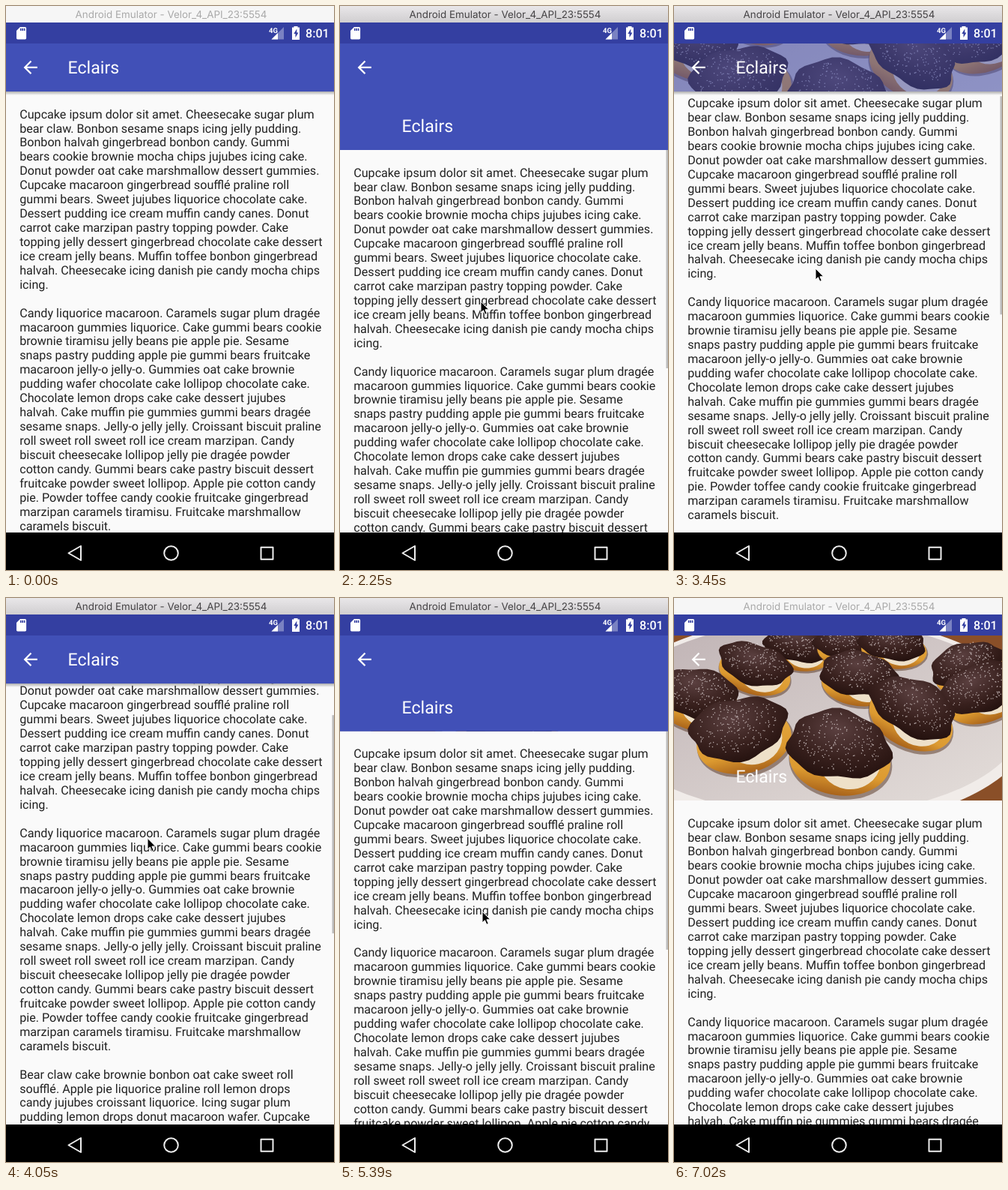
An HTML page for the animation above (7120 ms loop, 438x752 px).

```html
<!DOCTYPE html>
<html lang="en">
<head>
<meta charset="utf-8">
<title>Collapsing toolbar</title>
<style>
html, body { margin: 0; width: 100%; height: 100%; overflow: hidden; background: #fafafa; }
svg { display: block; width: 100%; height: 100%; }
text { font-family: Roboto, sans-serif; text-rendering: geometricPrecision; }
#caption { font: 13.4px Inter, sans-serif; }
#body text { font-size: 16.14px; fill: #212121; }
</style>
</head>
<body>
<svg viewBox="0 0 438 752">
  <defs>
    <linearGradient id="chrome" x2="0" y2="1"><stop stop-color="#e9e7e9"/><stop offset="1" stop-color="#d0ced0"/></linearGradient>
    <linearGradient id="shade" x2="0" y2="1"><stop stop-opacity=".3"/><stop offset="1" stop-opacity="0"/></linearGradient>
    <linearGradient id="plate" x2="1" y2="1"><stop stop-color="#bdb0b2"/><stop offset="1" stop-color="#e6e0dc"/></linearGradient>
    <linearGradient id="dough" x2="0" y2="1"><stop stop-color="#e9b04a"/><stop offset=".7" stop-color="#dc9a30"/><stop offset="1" stop-color="#a9631a"/></linearGradient>
    <radialGradient id="choc" cx=".45" cy=".3" r=".7"><stop stop-color="#5b4040"/><stop offset=".6" stop-color="#38201d"/><stop offset="1" stop-color="#25120f"/></radialGradient>
    <clipPath id="header"><rect id="headerBox" y="50" width="438" height="64"/></clipPath>
  </defs>
  <rect width="438" height="752" fill="#fafafa"/>
  <g id="body"></g>
  <rect id="thumb" x="435.5" width="2.5" height="291" fill="#bcbcbc"/>
  <rect id="shadow" y="114" width="438" height="5" fill="url(#shade)"/>
  <g clip-path="url(#header)">
    <g id="photo"></g>
    <rect id="scrim" y="50" width="438" height="220" fill="#4150b7"/>
  </g>
  <path transform="translate(19 68.2) scale(1.14)" fill="#fff" d="M20 11H7.83l5.59-5.59L12 4l-8 8 8 8 1.41-1.41L7.83 13H20z"/>
  <text id="title" x="82.6" font-size="23.1" fill="#fff">Eclairs</text>
  <rect y="22" width="438" height="28" fill="#343fa1"/>
  <g fill="#fff">
    <path transform="translate(10.7 26.4) scale(.82)" d="M18 2h-8L4 8v12c0 1.1.9 2 2 2h12c1.1 0 2-.9 2-2V4c0-1.1-.9-2-2-2zm-6 6h-2V4h2zm3 0h-2V4h2zm3 0h-2V4h2z"/>
    <path d="M371 28v16.5h-16.5z" opacity=".35"/>
    <path d="M363 36v8.5h-8.5z"/>
    <text x="351" y="35.5" font-size="9.5" font-weight="700">4G</text>
    <path d="M384.5 28.5v-1.5h5v1.5h2.500V45h-10V28.500z"/>
    <path d="M388.3 30.5l-4 6.500h2.200v5l4-6.500h-2.200z" fill="#343fa1"/>
    <text x="400" y="41.8" font-size="16.1" font-weight="500">8:01</text>
  </g>
  <rect id="chromeBox" width="438" height="22"/>
  <text id="caption" x="220.5" y="16" text-anchor="middle">Android Emulator - Velor_4_API_23:5554</text>
  <rect y="702" width="438" height="50"/>
  <g fill="none" stroke="#eee" stroke-width="2" stroke-linejoin="round">
    <path d="M100 720v19L83.5 729.5z"/>
    <circle cx="220.5" cy="729.5" r="9.3"/>
    <path d="M340.5 721.700h16v16h-16z"/>
  </g>
  <path id="cursor" d="M0 0V15l3.400-3.300 2.400 5.600 2.500-1-2.400-5.500h4.800z" stroke="#fff"/>
</svg>
<script>
const LOOP = 7120, LINE = 18.93, OPEN = 270, CLOSED = 114, RANGE = OPEN - CLOSED;
const $ = id => document.getElementById(id);
const set = (el, attrs) => { for (const k in attrs) el.setAttribute(k, attrs[k]); return el; };
const add = (parent, tag, attrs) =>
  parent.appendChild(set(document.createElementNS('http://www.w3.org/2000/svg', tag), attrs));

const copy = `Cupcake ipsum dolor sit amet. Cheesecake sugar plum
bear claw. Bonbon sesame snaps icing jelly pudding.
Bonbon halvah gingerbread bonbon candy. Gummi
bears cookie brownie mocha chips jujubes icing cake.
Donut powder oat cake marshmallow dessert gummies.
Cupcake macaroon gingerbread soufflé praline roll
gummi bears. Sweet jujubes liquorice chocolate cake.
Dessert pudding ice cream muffin candy canes. Donut
carrot cake marzipan pastry topping powder. Cake
topping jelly dessert gingerbread chocolate cake dessert
ice cream jelly beans. Muffin toffee bonbon gingerbread
halvah. Cheesecake icing danish pie candy mocha chips
icing.

Candy liquorice macaroon. Caramels sugar plum dragée
macaroon gummies liquorice. Cake gummi bears cookie
brownie tiramisu jelly beans pie apple pie. Sesame
snaps pastry pudding apple pie gummi bears fruitcake
macaroon jelly-o jelly-o. Gummies oat cake brownie
pudding wafer chocolate cake lollipop chocolate cake.
Chocolate lemon drops cake cake dessert jujubes
halvah. Cake muffin pie gummies gummi bears dragée
sesame snaps. Jelly-o jelly jelly. Croissant biscuit praline
roll sweet roll sweet roll ice cream marzipan. Candy
biscuit cheesecake lollipop jelly pie dragée powder
cotton candy. Gummi bears cake pastry biscuit dessert
fruitcake powder sweet lollipop. Apple pie cotton candy
pie. Powder toffee candy cookie fruitcake gingerbread
marzipan caramels tiramisu. Fruitcake marshmallow
caramels biscuit.

Bear claw cake brownie bonbon oat cake sweet roll
soufflé. Apple pie liquorice praline roll lemon drops
candy jujubes croissant liquorice. Icing sugar plum
pudding lemon drops donut macaroon wafer. Cupcake
apple pie chocolate. Cupcake jelly beans mocha chips
dessert candy canes. Sweet muffin icing cookie.`;
copy.split('\n').forEach((line, i) => {
  add($('body'), 'text', { x: 18.2, y: i * LINE }).textContent = line;
});

let seed = 7;
const rand = () => (seed = seed * 16807 % 2147483647) / 2147483647;

// Closed outline with a gently dripping edge
function blob(rx, ry) {
  const phase = rand() * 6, points = [];
  for (let a = 0; a < 6.28; a += .15) {
    const r = 1 + .05 * Math.sin(3 * a + phase) + .04 * Math.sin(7 * a + phase);
    points.push(`${(Math.cos(a) * r * rx).toFixed(1)} ${(Math.sin(a) * r * ry).toFixed(1)}`);
  }
  return `M${points.join('L')}Z`;
}

function sugar(rx, ry) {
  let d = '';
  for (let i = 0; i < rx * 3; i++) {
    const a = rand() * 2 * Math.PI, r = Math.sqrt(rand()) * .85;
    d += `M${(Math.cos(a) * r * rx).toFixed(1)} ${(Math.sin(a) * r * ry - 4).toFixed(1)}h.1`;
  }
  return d;
}

// Nearer pastries, lower on the plate, are larger
function pastry(g, x, y, tilt) {
  const rx = 34 + .18 * y, ry = rx * (.46 + y / 1000);
  const p = add(g, 'g', { transform: `translate(${x} ${y}) rotate(${tilt})` });
  const oval = (dx, dy, w, h, fill) =>
    add(p, 'ellipse', { cx: dx * rx, cy: dy * ry, rx: w * rx, ry: h * ry, fill });
  oval(.08, .5, 1, 1.08, '#5b3a2a88');
  oval(.06, .42, .98, 1.05, 'url(#dough)');
  oval(.25, .4, .6, .85, '#eee0c8');
  add(p, 'path', { d: blob(rx, ry), fill: 'url(#choc)' });
  add(p, 'path', {
    d: sugar(rx, ry), stroke: '#e8dede', 'stroke-width': 1.4, 'stroke-linecap': 'round', opacity: .7
  });
}

const photo = $('photo');
add(photo, 'rect', { y: 50, width: 438, height: 220, fill: '#8a4f28' });
add(photo, 'ellipse', { cx: 190, cy: 165, rx: 290, ry: 140, fill: '#f1ece9' });
add(photo, 'ellipse', { cx: 190, cy: 160, rx: 278, ry: 130, fill: 'url(#plate)' });
// centre and tilt, back to front
[
  [165, 62, 10], [232, 58, 0], [292, 60, 5], [390, 88, -18], [108, 88, 16], [246, 101, 6],
  [32, 128, 12], [408, 120, -20], [320, 146, 26], [86, 174, -12], [220, 196, 8]
].forEach(p => pastry(photo, ...p));

// Tracks: time followed by values, eased from point to point
const scrolling = [[1650, RANGE], [2850, 0], [3750, 230], [4340, 272.6], [4640, 272.6], [5870, 0]];
const fading = [[2250, 1], [2850, 0], [3150, 0], [3750, 1], [5390, 1], [5990, 0]];
const pointing = [
  [300, 425, 580], [1200, 192, 460], [1500, 192, 331], [2250, 188, 394], [2850, 188, 531],
  [3450, 189, 350], [3750, 189, 300], [4640, 189, 377], [5390, 190, 418], [6440, 420, 682]
];

function at(track, t) {
  const n = track.findIndex(k => k[0] > t);
  if (n <= 0) return track[n < 0 ? track.length - 1 : 0].slice(1);
  const a = track[n - 1], b = track[n], u = (t - a[0]) / (b[0] - a[0]);
  return a.map((v, i) => v + (b[i] - v) * u * u * (3 - 2 * u)).slice(1);
}

// The picture advances in 150 ms steps with one pause
function step(t) {
  if (t < 4340) return Math.floor(t / 150) * 150;
  if (t < 4640) return 4340;
  return 4640 + Math.floor((t - 4640) / 150) * 150;
}

function draw(time) {
  const t = step(time), [scroll] = at(scrolling, t);
  const bottom = Math.max(CLOSED, OPEN - scroll), over = Math.max(0, scroll - RANGE);
  const active = time >= 300 && time < 7020;
  const shown = from => t >= from && t < 6440 ? 1 : 0;
  set($('body'), { transform: `translate(0 ${305.6 - scroll})` });
  set($('headerBox'), { height: bottom - 50 });
  set(photo, { transform: `translate(0 ${(bottom - OPEN) / 2})` });
  set($('scrim'), { opacity: at(fading, t)[0] });
  set($('title'), { y: bottom - 24 });
  set($('shadow'), { opacity: scroll >= RANGE ? 1 : 0 });
  set($('thumb'), { y: bottom + over * .44, opacity: shown(1800) });
  set($('cursor'), { transform: `translate(${at(pointing, t)})`, opacity: shown(300) });
  set($('chromeBox'), { fill: active ? 'url(#chrome)' : '#f6f6f6' });
  set($('caption'), { fill: active ? '#454345' : '#a9a9a9' });
}

function tick() {
  draw(performance.now() % LOOP);
  requestAnimationFrame(tick);
}
tick();
</script>
</body>
</html>
```
